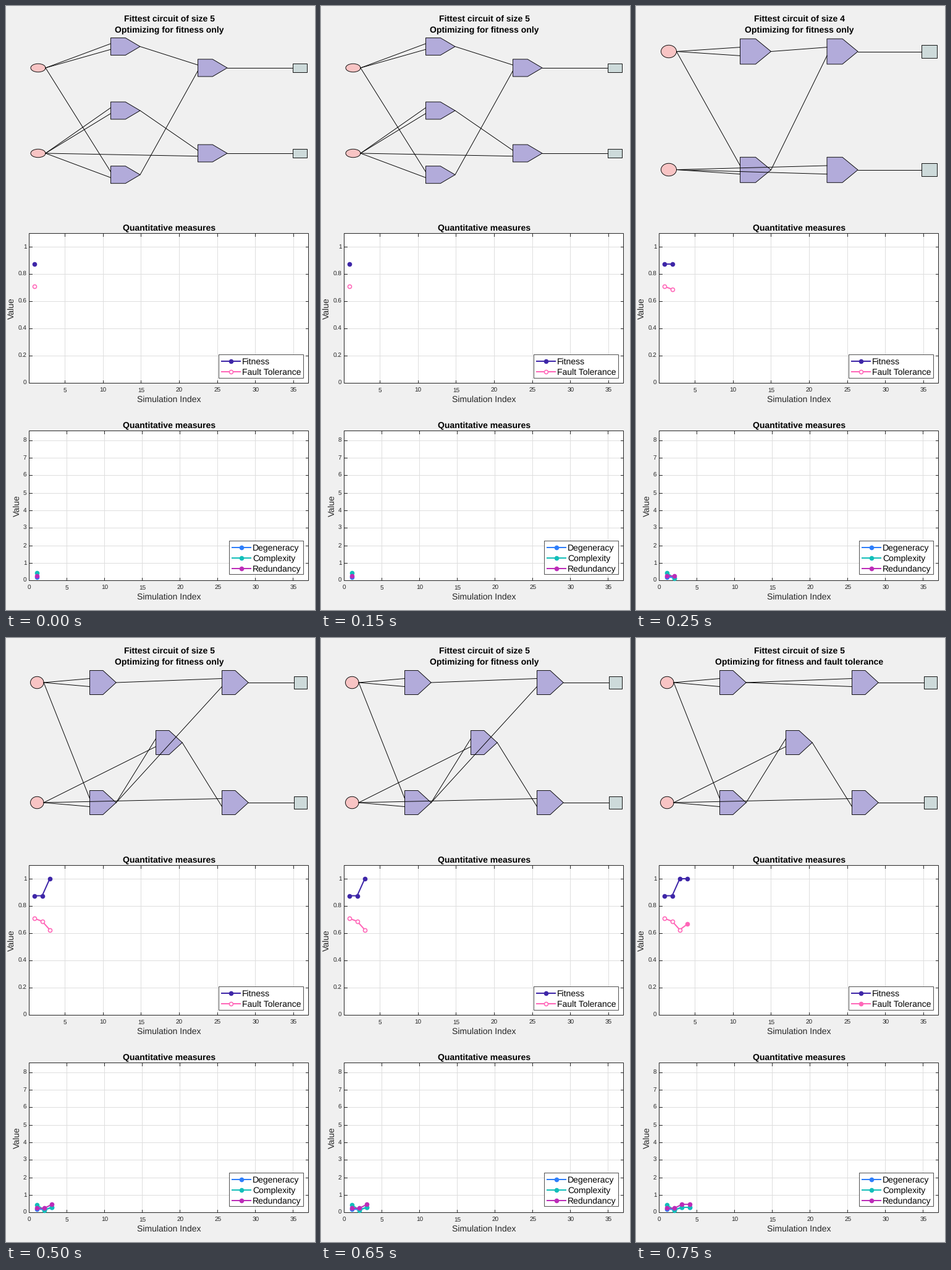
These frames come from a looping animation (500 by 976 pixels, 1 s). A matplotlib script:

```python
import matplotlib.pyplot as plt
from matplotlib.animation import FuncAnimation
from matplotlib.patches import Ellipse, Polygon, Rectangle

W, H, DPI = 500, 976, 64
PX = 72 / DPI  # points per pixel
plt.rcParams["font.family"] = "Liberation Sans"
plt.rcParams["text.hinting"] = "none"

INK = "#262626"
INDIGO, PINK = "#3e26a8", "#ff66b8"
BLUE, TEAL, PURPLE = "#2e7efa", "#12beb9", "#bc2cb8"

FITNESS = [0.875, 0.875, 1, 1]
TOLERANCE = [0.708, 0.6875, 0.625, 0.667]
DEGENERACY = [0.2, 0.16, 0.29, 0.29]
COMPLEXITY = [0.43, 0.13, 0.29, 0.29]
REDUNDANCY = [0.24, 0.24, 0.46, 0.46]
TOLERANT = [False, False, False, True]

# Gates are (left, centre y); wires are (from, to gate, input slot).
WIDE = dict(
    rows=(100, 238), source=(52, 24, 13.5), sink=(464, 13.5), gate=(47.5, 28),
    gates=[(169.5, 65.5), (169.5, 169), (169.5, 272.7), (310.5, 100), (310.5, 238)],
    wires=[("A", 0, 0), ("A", 0, 1), ("A", 2, 0), ("B", 1, 0), ("B", 1, 1),
           ("B", 2, 1), ("B", 4, 1), (0, 3, 0), (2, 3, 1), (1, 4, 0)])
SQUARE = dict(
    rows=(73.5, 264.5), source=(53, 25, 20.5), sink=(462, 20.5), gate=(50, 41),
    gates=[(168.5, 73.5), (168.5, 264.8), (309, 73.5), (309, 264.8)],
    wires=[("A", 0, 0), ("A", 0, 1), ("A", 1, 0), ("B", 1, 1), ("B", 3, 0),
           ("B", 3, 1), (0, 2, 0), (1, 2, 1)])
CROSSED = dict(
    rows=(72, 266), source=(50.3, 21.5, 19.5), sink=(466, 19.5), gate=(42.7, 39),
    gates=[(135.5, 72), (135.5, 266), (242.5, 169), (349.5, 72), (349.5, 266)],
    wires=[("A", 0, 0), ("A", 0, 1), ("A", 1, 0), ("B", 1, 1), ("B", 2, 1),
           ("B", 4, 0), (1, 2, 0), (0, 3, 0), (2, 4, 1), (1, 3, 1)])
PARALLEL = dict(CROSSED, wires=CROSSED["wires"][:-1] + [(0, 3, 1)])
CIRCUITS = [WIDE, SQUARE, CROSSED, PARALLEL]

fig = plt.figure(figsize=(W / DPI, H / DPI), dpi=DPI, facecolor="#f0f0f0")
ax = fig.add_axes([0, 0, 1, 1])


def text(x, y, s, size=14, color=INK, ha="center", **kw):
    ax.text(x, y, s, fontsize=size * PX, color=color, ha=ha, va="baseline", **kw)


def title(y, s):
    text(264, y, s, color="black", weight="bold")


def line(xs, ys, color=INK, width=1.0, z=2, **kw):
    ax.plot(xs, ys, color=color, lw=width * PX, zorder=z, **kw)


def dots(xs, ys, color, face=None, size=6):
    ax.plot(xs, ys, "o", ms=size * PX, mec=color, mfc=face or color,
            mew=1.6 * PX, zorder=5)


def series(xs, ys, color):
    line(xs, ys, color, 2, 5, solid_joinstyle="round")
    dots(xs, ys, color)


def shape(patch, face):
    patch.set(facecolor=face, edgecolor="black", linewidth=0.9 * PX, zorder=2)
    ax.add_patch(patch)


def circuit(c):
    gw, gh = c["gate"]
    cx, ew, eh = c["source"]
    sx, sh = c["sink"]
    gates, rows = c["gates"], c["rows"]
    for y in rows:
        shape(Ellipse((cx, y), ew, eh), "#f8c4c4")
        shape(Rectangle((sx, y - sh / 2), 487 - sx, sh), "#cddada")
    for x, y in gates:
        t, b, mid = y - gh / 2, y + gh / 2, x + gw / 2
        shape(Polygon([(x, t), (mid, t), (x + gw, y), (mid, b), (x, b)]), "#b2abda")

    starts = {i: (x + gw, y) for i, (x, y) in enumerate(gates)}
    starts.update({k: (cx + ew / 2, y) for k, y in zip("AB", rows)})
    for a, b, slot in c["wires"]:
        x, y = gates[b]
        x0, y0 = starts[a]
        line([x0, x], [y0, y + (2 * slot - 1) * gh / 6], "black", 0.95, 3)
    for (x, y), row in zip(gates[-2:], rows):
        line([x + gw, sx], [row, row], "black", 0.95, 3)


def panel(top, bottom, xticks, yticks, fx, fy, name_x):
    left, right = 37, 489
    ax.add_patch(Rectangle((left, top), right - left, bottom - top, fc="white", lw=0))
    for v in xticks:
        x = fx(v)
        text(x + 0.5, bottom + 14.5, str(v), 10)
        if left + 2 < x:
            line([x, x], [top, bottom], "#dedede")
            for y, d in ((top, 4.5), (bottom, -4.5)):
                line([x, x], [y, y + d], z=3)
    for v in yticks:
        y = fy(v)
        text(33.5, y + 3, f"{v:g}", 10, ha="right")
        if y < bottom - 2:
            line([left, right], [y, y], "#dedede")
            for x, d in ((left, 4.5), (right, -4.5)):
                line([x, x + d], [y, y], z=3)
    ax.add_patch(Rectangle((left, top), right - left, bottom - top,
                           fill=False, ec=INK, lw=PX, zorder=4))
    title(top - 5, "Quantitative measures")
    text(264, bottom + 30.5, "Simulation Index")
    text(name_x, (top + bottom) / 2 + 1, "Value", rotation=90, rotation_mode="anchor")


def legend(x, y, height, rows):
    ax.add_patch(Rectangle((x, y), 481 - x, height, fc="white", ec=INK,
                           lw=0.8 * PX, zorder=4))
    for i, (name, color, face) in enumerate(rows):
        cy = y + 11 + 17 * i
        line([x + 4.5, x + 34.5], [cy, cy], color, 2, 5)
        dots([x + 19.5], [cy], color, face)
        text(x + 38, cy + 5, name, color="black", ha="left", zorder=6)


def x1(v):
    return 95 + 12.33 * (v - 5)


def y1(v):
    return 609 - 220 * v


def x2(v):
    return 37.3 + 12.2 * v


def y2(v):
    return 928.2 - 28.3 * v


def draw(i):
    ax.clear()
    ax.set(xlim=(0, W), ylim=(H, 0))
    ax.axis("off")
    n = i + 1
    steps = range(1, n + 1)
    tolerant = TOLERANT[i]

    title(25, f"Fittest circuit of size {len(CIRCUITS[i]['gates'])}")
    goal = "fitness and fault tolerance" if tolerant else "fitness only"
    title(43, "Optimizing for " + goal)
    circuit(CIRCUITS[i])

    panel(367, 609, range(5, 36, 5), [0, 0.2, 0.4, 0.6, 0.8, 1], x1, y1, 13)
    xs = [x1(v) + 0.5 for v in steps]
    series(xs, [y1(v) for v in FITNESS[:n]], INDIGO)
    ys = [y1(v) for v in TOLERANCE[:n]]
    line(xs, ys, PINK, 2, 5)
    for x, y, full in zip(xs, ys, TOLERANT):
        dots([x], [y], PINK, None if full else "white")
    legend(344, 563, 38, [("Fitness", INDIGO, None),
                          ("Fault Tolerance", PINK, None if tolerant else "white")])

    panel(686, 928, range(0, 36, 5), range(9), x2, y2, 22)
    xs = [x2(v) + 0.5 for v in steps]
    for data, color in ((DEGENERACY, BLUE), (COMPLEXITY, TEAL), (REDUNDANCY, PURPLE)):
        series(xs, [y2(v) for v in data[:n]], color)
    legend(361, 864, 54, [("Degeneracy", BLUE, None), ("Complexity", TEAL, None),
                          ("Redundancy", PURPLE, None)])
    return []


anim = FuncAnimation(fig, draw, frames=4, interval=250, repeat=True)
plt.show()
```
